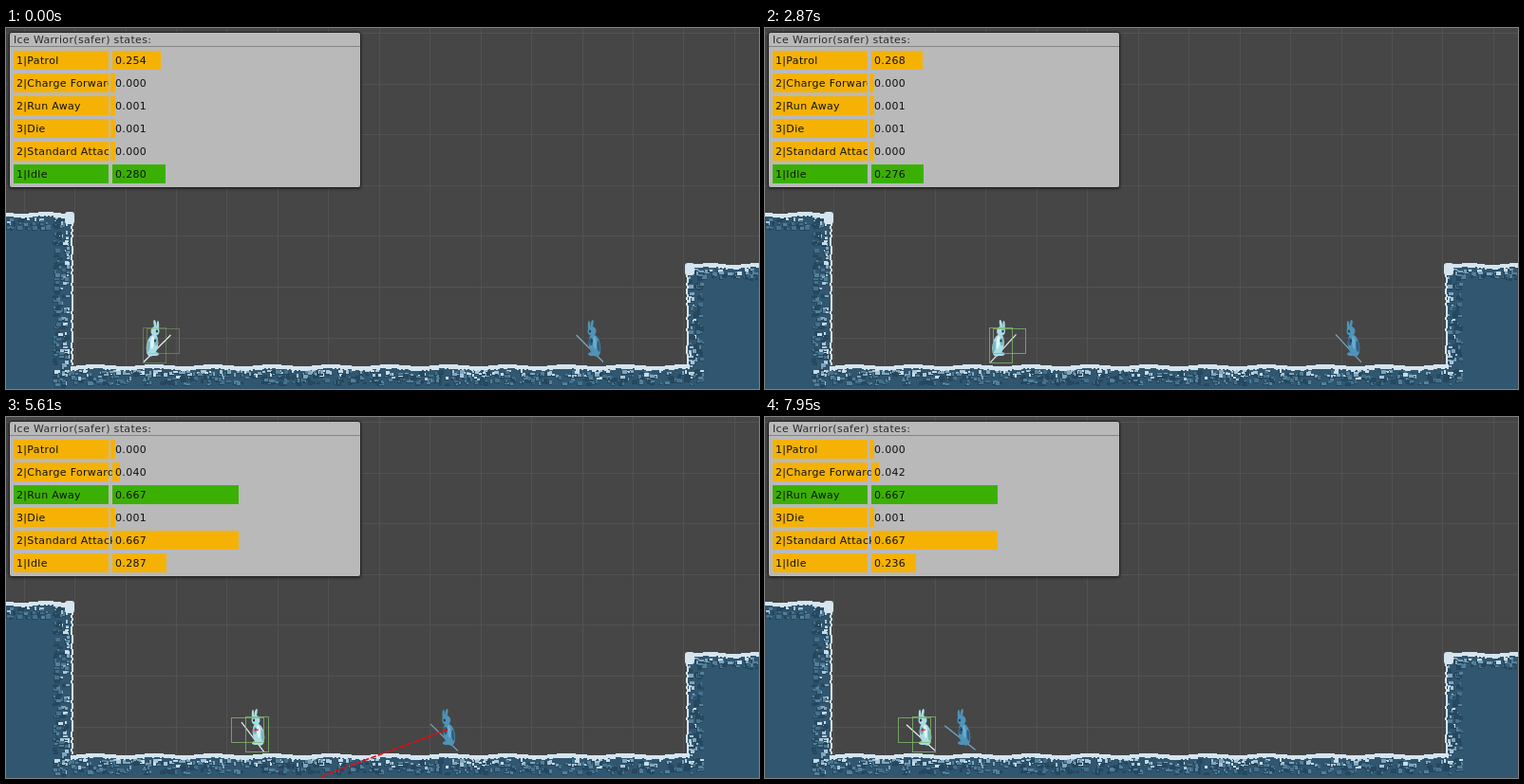
These frames come from a looping animation (793x381 px, 8 s). An HTML page with a canvas:

```html
<!DOCTYPE html>
<html lang="en">
<head>
<meta charset="utf-8">
<title>Utility states</title>
<style>
html, body { margin: 0; width: 100%; height: 100%; overflow: hidden; background: #464646; }
canvas { position: absolute; left: 0; top: 0; }
#panel {
  position: absolute; left: 3px; top: 4px; width: 371px; height: 165px; box-sizing: border-box;
  border: 1px solid #202020; border-radius: 3px; background: #b9b9b9;
  box-shadow: 0 1px 3px rgba(0,0,0,.45);
  font: 11px "DejaVu Sans", sans-serif; letter-spacing: .33px; color: #101010; white-space: nowrap;
}
#title {
  position: absolute; left: 0; top: 0; width: 365px; height: 14px; padding-left: 4px;
  line-height: 16px; color: #2b2b2b; border-bottom: 1px solid #858585;
}
.label, .value { position: absolute; height: 20px; line-height: 22px; text-indent: 3px; }
.label { left: 4px; overflow: hidden; background: linear-gradient(var(--c), var(--c)) 0 0 / 100px 20px no-repeat; }
.value { left: 108px; background: var(--c); }
.value.tiny { left: 106px; text-indent: 5px; }
</style>
</head>
<body>
<canvas id="stage" width="793" height="381"></canvas>
<div id="panel"><div id="title">Ice Warrior(safer) states:</div></div>
<script>
const W = 793, H = 381, LOOP = 8000, STEP = 70, TAU = Math.PI * 2;
const YELLOW = '#f5b204', GREEN = '#3bb004';
const ctx = document.getElementById('stage').getContext('2d');
const within = (t, a, b) => t >= a && t < b;

// The picture rests between bursts of steps; the first ones are single changes.
const bursts = [0, 100, 390, 620, 1750, 2870, 3690, 4570, 5450, 6270, 7150];
function stepTime(now) {
  const start = bursts.filter(b => b <= now).pop();
  const run = start < 620 ? 0 : Math.min(now - start, 800);
  return start + Math.floor(run / STEP) * STEP;
}

const ranks = { 'Patrol': 1, 'Charge Forward': 2, 'Run Away': 2, 'Die': 3, 'Standard Attack': 2, 'Idle': 1 };

// time, active state, scores that change
const decisions = [
  [0, 'Idle', { 'Patrol': .254, 'Charge Forward': 0, 'Run Away': .001, 'Die': .001, 'Standard Attack': 0, 'Idle': .28 }],
  [100, 'Idle', { 'Patrol': .315, 'Idle': .245 }],
  [620, 'Patrol', { 'Patrol': .301, 'Idle': .24 }],
  [2380, 'Idle', { 'Patrol': .268, 'Idle': .276 }],
  [3400, 'Charge Forward', { 'Patrol': .248, 'Charge Forward': .426, 'Idle': .325 }],
  [4340, 'Standard Attack', { 'Standard Attack': .667 }],
  [4700, 'Run Away', { 'Patrol': 0, 'Charge Forward': .04, 'Run Away': .667, 'Idle': .287 }],
  [6700, 'Standard Attack', { 'Charge Forward': .042, 'Run Away': .001 }],
  [7200, 'Run Away', { 'Run Away': .667, 'Idle': .236 }]
];

function makeRow(name, i) {
  const [label, value] = ['label', 'value'].map(kind => {
    const el = document.createElement('div');
    el.className = kind;
    el.style.top = 19 + i * 24 + 'px';
    return document.getElementById('panel').appendChild(el);
  });
  label.textContent = ranks[name] + '|' + name;
  return { name, label, value };
}
const rows = Object.keys(ranks).map(makeRow);

function drawPanel(t) {
  const past = decisions.filter(d => d[0] <= t);
  const active = past[past.length - 1][1];
  const scores = Object.assign({}, ...past.map(d => d[2]));
  for (const { name, label, value } of rows) {
    const v = scores[name], tiny = v < .01;
    for (const el of [label, value]) el.style.setProperty('--c', name === active ? GREEN : YELLOW);
    label.style.width = (tiny ? 100 : 104) + 'px';
    value.style.width = (tiny ? 5 : Math.max(8, Math.round(v * 200))) + 'px';
    value.classList.toggle('tiny', tiny);
    value.textContent = v.toFixed(3);
  }
}

let seed = 17;
const rand = () => (seed = seed * 16807 % 2147483647) / 2147483647;
const whole = (low, count) => low + Math.floor(rand() * count);

function paintScene() {
  const canvas = document.createElement('canvas');
  canvas.width = W; canvas.height = H;
  const g = canvas.getContext('2d');
  const box = (color, x, y, w, h) => { g.fillStyle = color; g.fillRect(x, y, w, h); };
  const snow = '#d4e5f0';

  box('#464646', 0, 0, W, H);
  for (let x = 18.6; x < W; x += 53.45) box('#525252', Math.round(x), 0, 1, H);
  for (let y = 5; y < H; y += 53.6) box('#525252', 0, Math.round(y), W, 1);

  const rock = '#31566f';
  box(rock, 0, 197, 69, 184);
  box(rock, 718, 251, 75, 130);
  box(rock, 60, 358, 670, 23);

  // Pebbles crowd and brighten towards the open side, each over its shadow.
  const near = ['#a9c5d7', '#c6dcea', '#7fa5bd'], far = ['#54809a', '#44718c', '#264960'];
  function rubble(x, y, w, h, side) {
    for (let n = w * h / 21; n > 0; n--) {
      const depth = Math.pow(rand(), 1.2), along = rand();
      const u = side === 'l' ? depth : side === 'r' ? 1 - depth : along;
      const v = side === 't' ? depth : along;
      const pw = whole(2, 4), ph = whole(2, 3);
      const px = Math.floor(x + u * (w - pw)), py = Math.floor(y + v * (h - ph));
      box('#25465c', px - 1, py + 1, pw + 1, ph);
      box((rand() > depth * 1.3 + .15 ? near : far)[whole(0, 3)], px, py, pw, ph);
    }
  }
  rubble(0, 200, 66, 14, 't');
  rubble(50, 204, 18, 176, 'r');
  rubble(50, 361, 686, 17, 't');
  rubble(719, 255, 17, 120, 'l');
  rubble(719, 254, 74, 13, 't');

  function ground(x0, x1, y, period) {
    for (let x = x0; x < x1; x += 2) {
      const top = Math.round(y - Math.sin((x - 78) * TAU / period));
      box(snow, x, top, 2, whole(4, 2));
    }
  }
  function cliff(x, y) {
    for (; y < 356; y += 3) box(snow, x + whole(0, 2), y, 2, 3);
  }
  ground(0, 68, 195, 50);
  ground(722, W, 249, 50);
  ground(68, 720, 356, 62);
  cliff(68, 206);
  cliff(716, 260);
  g.fillStyle = snow;
  g.beginPath();
  g.roundRect(62, 194, 10, 13, 3);
  g.roundRect(715, 248, 10, 13, 3);
  g.fill();
  return canvas;
}
const scene = paintScene();

function line(color, width, x1, y1, x2, y2, dash = []) {
  ctx.strokeStyle = color;
  ctx.lineWidth = width;
  ctx.setLineDash(dash);
  ctx.beginPath();
  ctx.moveTo(x1, y1);
  ctx.lineTo(x2, y2);
  ctx.stroke();
  ctx.setLineDash([]);
}

function oval(color, x, y, rx, ry, turn = 0) {
  ctx.fillStyle = color;
  ctx.beginPath();
  ctx.ellipse(x, y, rx, ry, turn, 0, TAU);
  ctx.fill();
}

// sway 0..1 tilts the lowered spear
function warrior(x, dir, tone, charging, sway) {
  ctx.save();
  ctx.translate(x, 308);
  ctx.scale(dir, 1);
  if (charging) line(tone.spear, 1.2, -22, 2, 24, 17);
  else line(tone.spear, 1.2, -8 - 6 * sway, 46 - 3 * sway, 16 + 3 * sway, 14 + 4 * sway);
  if (charging) ctx.scale(1.05, .85);
  oval(tone.base, -2, 27, 6, 12, .2);
  oval(tone.base, 0, 36, 5, 2);
  oval(tone.base, 1, 12, 4.5, 5);
  oval(tone.base, 1, 5, 1.4, 5, -.2);
  oval(tone.base, 4, 6, 1.2, 5);
  oval(tone.dark, -6, 28, 1.6, 6, .1);
  oval(tone.dark, 2, 23, 2, 4);
  oval(tone.light, -2, 24, 1.8, 7, .1);
  oval('#263f4b', 3, 12, 1.2, 1.5);
  oval('#263f4b', 1, 22, 1.1, 1.6);
  ctx.restore();
}
const pale = { base: '#a9dde4', dark: '#7db7c2', light: '#dcf5f6', spear: '#e3eef0' };
const blue = { base: '#4f93b9', dark: '#315f7e', light: '#69abd0', spear: '#7ba9c4' };

// moves: start, end, place reached
const travel = (x, moves, t) => moves.reduce((at, [a, b, to]) =>
  at + (to - at) * Math.min(1, Math.max(0, (t - a) / (b - a))), x);
const leftMoves = [[620, 1360, 203], [1750, 2490, 247.5], [3400, 4252, 438], [4763, 5880, 203], [7200, 7430, 167]];
const rightMoves = [[3680, 4300, 475], [5450, 5600, 464], [6270, 7230, 208]];
const swing = t => .5 - .5 * Math.cos((t - 1750) * TAU / 1400);

function gizmo(x, dir, alpha) {
  ctx.strokeStyle = `rgba(126,184,108,${alpha})`;
  ctx.lineWidth = 1;
  const c = Math.round(x);
  ctx.strokeRect(c - 11.5, 316.5, 24, 37);
  ctx.strokeRect(c + (dir > 0 ? -7.5 : -26.5), 317.5, 34, 26);
}

function drawStage(t) {
  ctx.drawImage(scene, 0, 0);
  const lx = travel(156, leftMoves, t), rx = travel(618, rightMoves, t);
  const fleeing = within(t, 4700, 5880) || t >= 7200;
  const dir = fleeing ? -1 : 1;
  const pose = t < 390 ? 0 : t;

  warrior(rx, -1, blue, within(t, 3690, 5400) || within(t, 6300, 7200), swing(pose));
  warrior(lx, dir, pale, within(t, 3400, 4700), swing(pose + (t > 5400 ? 400 : 0)));
  gizmo(lx, dir, t < 620 ? .45 : .8);
  if (fleeing || within(t, 620, 2380)) line('#e04848', 1.5, lx - 3, 331, lx + 2, 330);

  const clash = within(t, 3690, 4460);
  if (clash) line('#f00808', 1.6, lx, 330, 457, 381, [6, 2]);
  if (clash || within(t, 5450, 6400)) line('#f00808', 1.6, rx, 330, 330, 380, [6, 2]);
}

let shown = -1;
const began = performance.now();
function frame() {
  const t = stepTime((performance.now() - began) % LOOP);
  if (t !== shown) {
    shown = t;
    drawPanel(t);
    drawStage(t);
  }
  requestAnimationFrame(frame);
}
frame();
</script>
</body>
</html>
```
